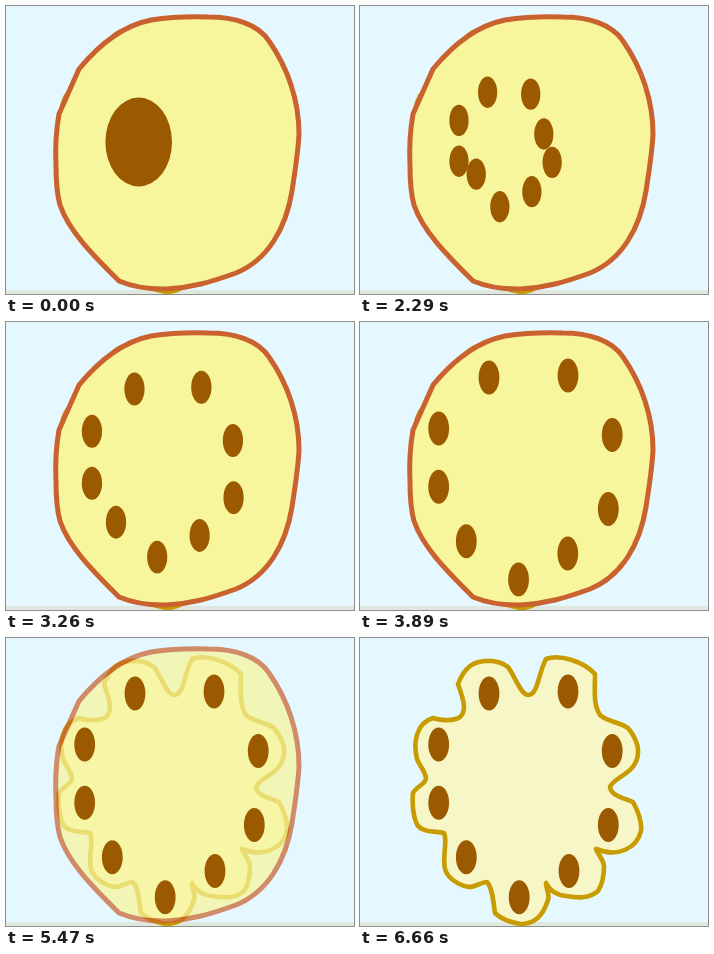
Recreate the animation shown at these times as an HTML page. Size 348 by 288 pixels, loop 8 s.

```html
<!DOCTYPE html>
<html lang="en">
<head>
<meta charset="utf-8">
<title>Dividing cell</title>
<style>
  html, body { margin: 0; width: 100%; height: 100%; overflow: hidden; background: #e5f7ff; }
  svg { display: block; width: 100%; height: 100%; }
</style>
</head>
<body>
<svg viewBox="0 0 348 288">
  <rect width="348" height="288" fill="#e5f7ff"/>
  <rect y="284" width="348" height="4" fill="#dfe8de"/>
  <path fill="#f7f6c6" stroke="#c89b00" stroke-width="4.6" stroke-linejoin="round" d="M98 46
    C101 38 105 32 110 28 C118 22 137 20 148 29 C155 38 160 56 168 57 C178 57 178 36 186 21
    C199 16 223 23 235 36 C235 52 233 66 240 77 C248 84 260 84 268 90 C274 97 279 107 278 115
    C277 136 253 139 250 149 C251 158 264 160 273 164 C279 175 282 185 281 193
    C277 210 258 220 236 211 C238 217 243 220 244 228 C244 239 242 247 238 253
    C229 261 217 260 206 258 C195 257 189 251 186 245 C186 252 190 256 188 262
    C183 277 176 286 160 286 C149 284 141 281 135 275 C133 263 133 251 127 244
    C121 244 116 249 109 249 C97 247 87 239 85 231 C82 217 88 204 84 195
    C75 193 65 195 58 188 C53 180 52 165 53 155 C57 148 66 146 66 140
    C65 133 59 127 57 121 C53 105 56 85 73 80 C82 83 94 83 100 79 C108 72 102 58 98 46Z"/>
  <path id="cell" fill="#f7f69c" stroke="#c9622f" stroke-width="5" stroke-linejoin="round" d="M113 275
    C125 280 140 283.5 160 283 C185 282 205 276 230 267 C262 254 280 222 286 185
    C289 165 292 148 293 128 C293 95 282 62 263 35 C252 18 228 11 203 11
    C190 10.5 165 11 145 14 C115 20 92 40 73 63 L53 108 C50 125 49 140 50 160
    C50 178 51 188 54 199 C63 226 90 252 113 275Z"/>
  <g id="nuclei" fill="#9c5a00">
    <ellipse id="parent" cx="132.7" cy="136" rx="33.3" ry="44.5"/>
  </g>
</svg>
<script>
const LOOP = 8000, SPLIT = 1330, REF = 1620;
const cell = document.getElementById('cell');
const parent = document.getElementById('parent');
const nuclei = document.getElementById('nuclei');

// x, y at REF, resting x, y, arrival time
const seeds = [
  [127, 99.5, 129, 55.5, 3850],
  [153.7, 104, 208, 53.5, 3760],
  [108, 118, 78.7, 106.5, 3800],
  [108, 151, 78.7, 164.7, 3800],
  [120.5, 146, 106.3, 219.3, 3840],
  [154, 134.5, 252.2, 113, 3830],
  [167.7, 143, 248.3, 187, 3830],
  [156.8, 166.5, 209, 233, 3945],
  [132, 177, 159.2, 259.3, 3945]
].map(path => {
  const el = document.createElementNS('http://www.w3.org/2000/svg', 'ellipse');
  nuclei.append(el);
  return { el, path };
});

const lerp = (a, b, k) => a + (b - a) * k;
const fade = (t, from, to) => 1 - Math.min(1, Math.max(0, (t - from) / (to - from)));

function draw(t) {
  parent.setAttribute('opacity', t < SPLIT ? 1 : fade(t, 1280, 1850));
  cell.setAttribute('opacity', fade(t, 5000, 6660));
  for (const { el, path: [x0, y0, x1, y1, end] } of seeds) {
    const k = Math.min(1, (t - REF) / (end - REF));
    el.setAttribute('cx', lerp(x0, x1, k));
    el.setAttribute('cy', lerp(y0, y1, k));
    el.setAttribute('rx', lerp(9.3, 10.4, k));
    el.setAttribute('ry', lerp(15.1, 17, k));
    el.setAttribute('opacity', t < SPLIT ? 0 : 1);
  }
}

const start = performance.now();
function tick() {
  draw((performance.now() - start) % LOOP);
  requestAnimationFrame(tick);
}
tick();
</script>
</body>
</html>
```
